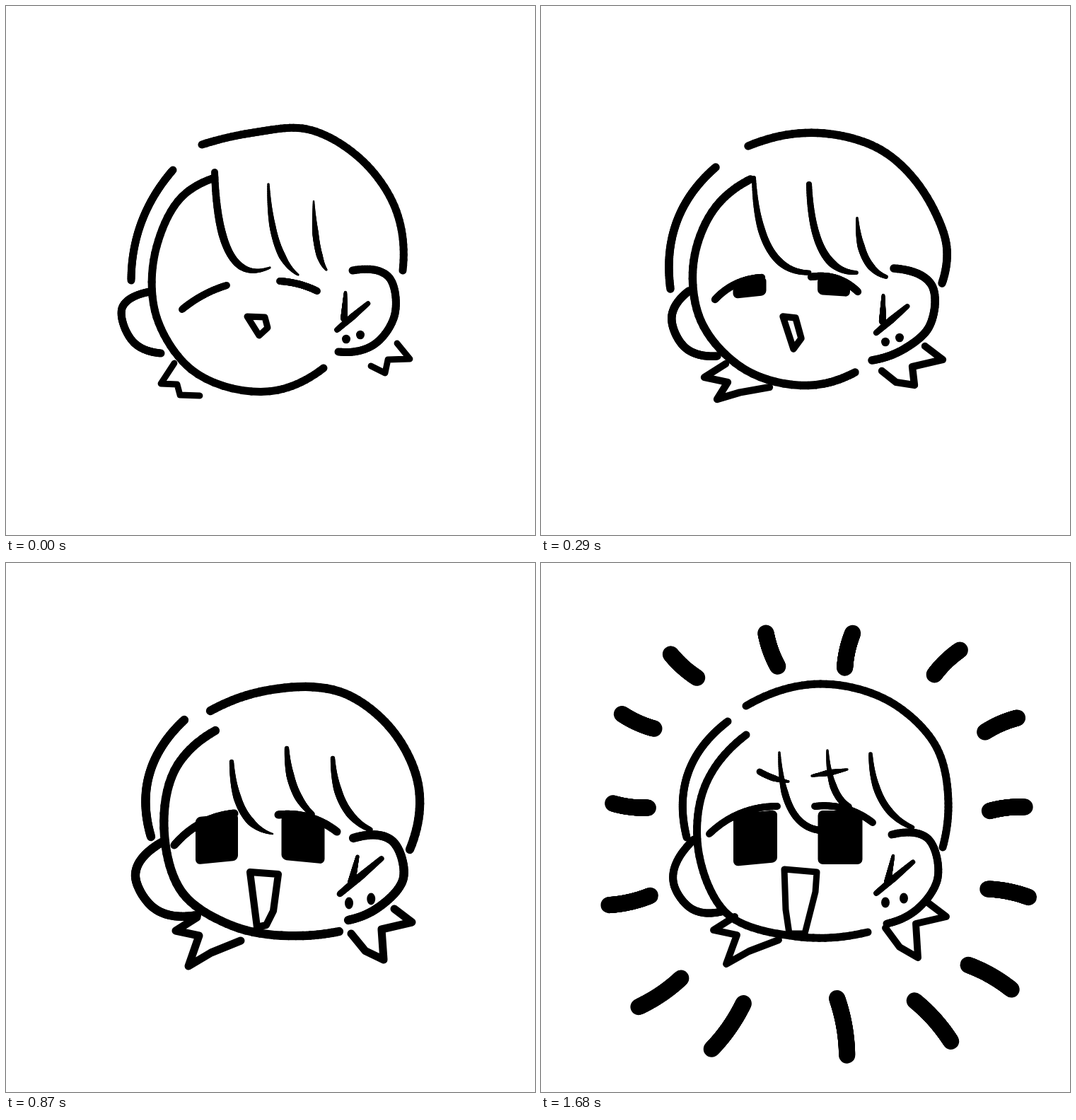
An HTML page with a canvas for the animation above (2030 ms loop, 748 by 748 pixels).

```html
<!DOCTYPE html>
<html lang="en">
<head>
<meta charset="utf-8">
<title>Waking up</title>
<style>
html, body { margin: 0; width: 100%; height: 100%; overflow: hidden; background: #fff; }
canvas { display: block; width: 100vw; height: 100vh; }
</style>
</head>
<body>
<canvas id="c" width="748" height="748"></canvas>
<script>
const g = document.getElementById('c').getContext('2d');
g.lineCap = g.lineJoin = 'round';

let pen = 11;   // base line weight of the current pose

const pairs = a => a.reduce((r, v, i) => (i % 2 ? r[r.length - 1].push(v) : r.push([v]), r), []);

// Strokes the path at(t), t in 0..1; widths are shares of the pen spread along it
function brush(at, widths = [1, 1], steps = 60) {
  let last = at(0);
  for (let k = 1; k <= steps; k++) {
    const t = k / steps, u = t * (widths.length - 1);
    const i = Math.min(Math.floor(u), widths.length - 2);
    const q = at(t);
    g.lineWidth = pen * (widths[i] + (widths[i + 1] - widths[i]) * (u - i));
    g.beginPath();
    g.moveTo(...last);
    g.lineTo(...q);
    g.stroke();
    last = q;
  }
}

const quad = (x0, y0, cx, cy, x1, y1) => t => {
  const a = (1 - t) * (1 - t), b = 2 * t * (1 - t), c = t * t;
  return [a * x0 + b * cx + c * x1, a * y0 + b * cy + c * y1];
};

// Smooth curve through a few key points, spaced by chord length
function curve(...nums) {
  const p = pairs(nums), n = p.length - 1;
  const h = [], d = [], v = [];
  for (let i = 0; i < n; i++) {
    const [a, b] = [p[i], p[i + 1]];
    h[i] = Math.hypot(b[0] - a[0], b[1] - a[1]);
    d[i] = [0, 1].map(j => (b[j] - a[j]) / h[i]);
  }
  for (let i = 1; i < n; i++)
    v[i] = [0, 1].map(j => (d[i - 1][j] * h[i] + d[i][j] * h[i - 1]) / (h[i - 1] + h[i]));
  v[0] = [0, 1].map(j => 2 * d[0][j] - v[1][j]);
  v[n] = [0, 1].map(j => 2 * d[n - 1][j] - v[n - 1][j]);
  return t => {
    const i = Math.min(n - 1, Math.floor(t * n)), s = t * n - i, r = 1 - s;
    return [0, 1].map(j =>
      p[i][j] * (1 + 2 * s) * r * r + p[i + 1][j] * s * s * (3 - 2 * s) +
      h[i] * s * r * (v[i][j] * r - v[i + 1][j] * s));
  };
}

const line = (...nums) => brush(curve(...nums));

// Shallow arc bowed upwards by a share of its length
function arc(x0, y0, x1, y1, bow, widths) {
  const cx = (x0 + x1) / 2 + bow * (y1 - y0);
  const cy = (y0 + y1) / 2 - bow * (x1 - x0);
  brush(quad(x0, y0, cx, cy, x1, y1), widths);
}

const lid = (x0, y0, x1, y1, bow = 0.2) => arc(x0, y0, x1, y1, bow, [0.9, 0.9]);

// Lock of hair: falls straight, then sweeps sideways
function bang(x0, y0, x1, y1, fall = 0.78, widths = [0.5, 0.9, 0.9, 0.6]) {
  brush(quad(x0, y0, x0 + 0.07 * (x1 - x0), y0 + fall * (y1 - y0), x1, y1), widths);
}

function zig(x, y, w, close, ...nums) {
  g.beginPath();
  pairs(nums).forEach(q => g.lineTo(x + q[0], y + q[1]));
  if (close) g.closePath();
  g.lineWidth = pen * w;
  g.stroke();
}

const mouth = (...nums) => zig(0, 0, 0.82, true, ...nums);

function pupil(x, y, w, h, shear) {
  g.save();
  g.transform(1, shear, 0, 1, x, y);
  g.beginPath();
  g.roundRect(-w / 2, -h / 2, w, h, 7);
  g.fill();
  g.restore();
}

function dot(x, y, rx, ry) {
  g.beginPath();
  g.ellipse(x, y, rx, ry, 0, 0, 7);
  g.fill();
}

// Slash, tick and two studs, hung from the slash's lower end
function earring(x, y, w, tick) {
  arc(x, y, x + w, y - 0.85 * w, 0, [0.7, 0.85, 0.6]);
  arc(x + tick, y - 53, x + tick / 2 + 4, y - 16, 0, [0.4, 0.9]);
  dot(x + 13, y + 13, 6, w / 7);
  dot(x + 0.75 * w, y + 7, 6, w / 7);
}

// Two ponytails, each placed by its outer tip
function tails(lx, ly, lDrop, rx, ry, rDrop) {
  zig(lx, ly, 0.9, false, 30, -19, 0, 0, 33, 7, 18, lDrop, 50, lDrop / 2 + 6, 92, 14);
  zig(rx, ry, 0.9, false, -25, -19, 0, 0, -43, 10, -40, rDrop, -66, rDrop / 2 + 14, -86, 16);
}

function asleep() {
  pen = 11;
  line(277,196, 350,179, 425,174, 500,215, 552,290, 561,374);
  line(236,232, 190,310, 177,388);
  line(295,243, 255,264, 213,340, 213,440, 262,514, 385,543, 449,512);
  line(203,404, 165,425, 182,477, 219,491);
  line(490,374, 540,382, 550,435, 520,479, 470,489);
  bang(295,235, 373,370, 1.22, [0.9, 1, 0.9, 0.3]);
  bang(371,252, 413,380, 0.8, [0.3, 0.8, 0.9, 0.3]);
  bang(435,276, 453,373, 0.8, [0.2, 0.8, 0.8, 0.3]);
  lid(249,429, 312,395, 0.1);
  lid(387,389, 440,403, 0.1);
  mouth(341,439, 366,440, 370,455, 358,466);
  earring(468, 458, 44, 12);
  zig(238, 505, 0.8, false, 0,0, -19,29, 4,30, 8,45, 36,46);
  zig(553, 477, 0.8, false, 0,0, 18,22, -13,23, -17,42, -37,32);
}

function stirring() {
  pen = 11.5;
  line(293,198, 400,180, 480,203, 555,287, 574,345, 567,392);
  line(247,228, 196,295, 183,400);
  line(296,245, 253,277, 216,360, 226,445, 290,515, 400,534, 444,518);
  line(209,403, 185,438, 205,484, 249,495);
  line(499,371, 552,394, 548,455, 515,484, 468,501);
  bang(301,243, 379,377, 1);
  bang(379,252, 446,377, 1, [0.7, 0.9, 1, 0.5]);
  bang(447,300, 488,383, 0.85, [0.3, 0.9, 0.9, 0.5]);
  lid(246,415, 312,384);
  lid(382,383, 448,404, 0.25);
  pupil(295, 398, 47, 27, -0.1);
  pupil(414, 397, 46, 25, 0.07);
  mouth(342,439, 360,441, 368,470, 357,485);
  earring(474, 462, 44, 10);
  tails(231, 525, 31, 568, 500, 36);
}

function drowsy() {
  pen = 12.3;
  line(278,205, 380,168, 460,182, 545,248, 586,340, 578,393);
  line(256,220, 203,295, 193,383);
  line(296,241, 240,297, 219,390, 245,470, 320,514, 425,529, 460,520);
  line(208,398, 182,435, 202,486, 262,496);
  line(492,380, 545,385, 550,440, 520,487, 477,503);
  bang(313,263, 379,378, 1);
  bang(384,257, 433,372, 0.7, [0.7, 0.9, 0.9, 0.5]);
  bang(452,291, 492,380, 0.78, [0.5, 0.9, 0.9]);
  lid(243,410, 322,373);
  lid(381,375, 458,398);
  pupil(296, 395, 62, 41, -0.13);
  pupil(418, 397, 56, 33, 0.17);
  mouth(347,439, 369,442, 368,470, 357,497);
  earring(476, 467, 43, 8);
  tails(234, 519, 47, 570, 499, 46);
}

function awake() {
  pen = 12.3;
  line(289,209, 365,181, 480,185, 545,235, 584,320, 571,405);
  line(252,222, 200,310, 205,387);
  line(296,237, 243,285, 224,385, 250,467, 320,513, 420,527, 471,521);
  line(220,395, 183,440, 208,487, 270,498);
  line(491,389, 545,392, 562,445, 525,488, 484,505);
  bang(319,281, 377,383, 0.88, [0.5, 0.9, 0.9, 0.2]);
  bang(397,262, 433,355, 0.7);
  bang(462,276, 515,377);
  lid(238,399, 323,354);
  lid(385,356, 468,380);
  pupil(298, 390, 60, 67, -0.1);
  pupil(420, 391, 61, 63, 0.1);
  mouth(345,437, 385,440, 378,492, 368,512, 355,515);
  earring(472, 468, 59, 25);
  tails(240, 520, 50, 574, 508, 53);
}

// Rays sit on a rounded square, lean flat and grow longer below
function rays() {
  for (const deg of [-128, -104, -81, -54, -32, -9, 16, 39, 58, 83, 116, 136, 162, 190, 213]) {
    const a = deg * Math.PI / 180, cos = Math.cos(a), sin = Math.sin(a);
    const r = 265 + 48 * Math.sin(2 * a) ** 2;
    const x = 393 + r * cos, y = 390 + r * sin;
    const lean = Math.atan2(0.7 * sin, cos), half = 25 + 16 * Math.max(0, sin);
    const dx = half * Math.cos(lean), dy = half * Math.sin(lean);
    arc(x - dx, y - dy, x + dx, y + dy, 0.08, [2.1, 2.1]);
  }
}

function shining() {
  pen = 11;
  rays();
  line(290,202, 395,171, 500,200, 560,262, 576,340, 568,402);
  line(264,224, 207,300, 206,388);
  line(290,243, 232,315, 224,415, 262,495, 360,528, 462,522);
  line(216,391, 188,455, 215,490, 255,493);
  line(496,384, 545,388, 561,445, 530,491, 489,510);
  bang(337,268, 395,378, 0.95, [0.3, 0.9, 0.9, 0.9]);
  bang(405,265, 435,345, 0.78, [0.3, 0.9, 0.9]);
  bang(466,270, 525,374);
  arc(309,295, 350,309, -0.1, [0.8, 0.8, 0.3]);
  arc(383,301, 433,292, 0, [0.3, 0.8, 0.3]);
  lid(238,383, 334,344);
  lid(387,344, 469,367);
  pupil(303, 389, 62, 74, -0.09);
  pupil(423, 388, 63, 76, 0);
  mouth(344,433, 390,437, 388,465, 373,524, 351,524, 346,490);
  earring(474, 467, 52, 24);
  tails(244, 519, 48, 573, 500, 58);
}

const poses = [asleep, stirring, drowsy, awake, shining];
const HOLD = 290, LOOP = 2030;
const start = performance.now();
let shown = -1;

function tick() {
  const t = (performance.now() - start) % LOOP;
  const i = Math.min(poses.length - 1, Math.floor(t / HOLD));
  if (i !== shown) {
    shown = i;
    g.fillStyle = '#fff';
    g.fillRect(0, 0, 748, 748);
    g.fillStyle = g.strokeStyle = '#000';
    poses[i]();
  }
  requestAnimationFrame(tick);
}
tick();
</script>
</body>
</html>
```
